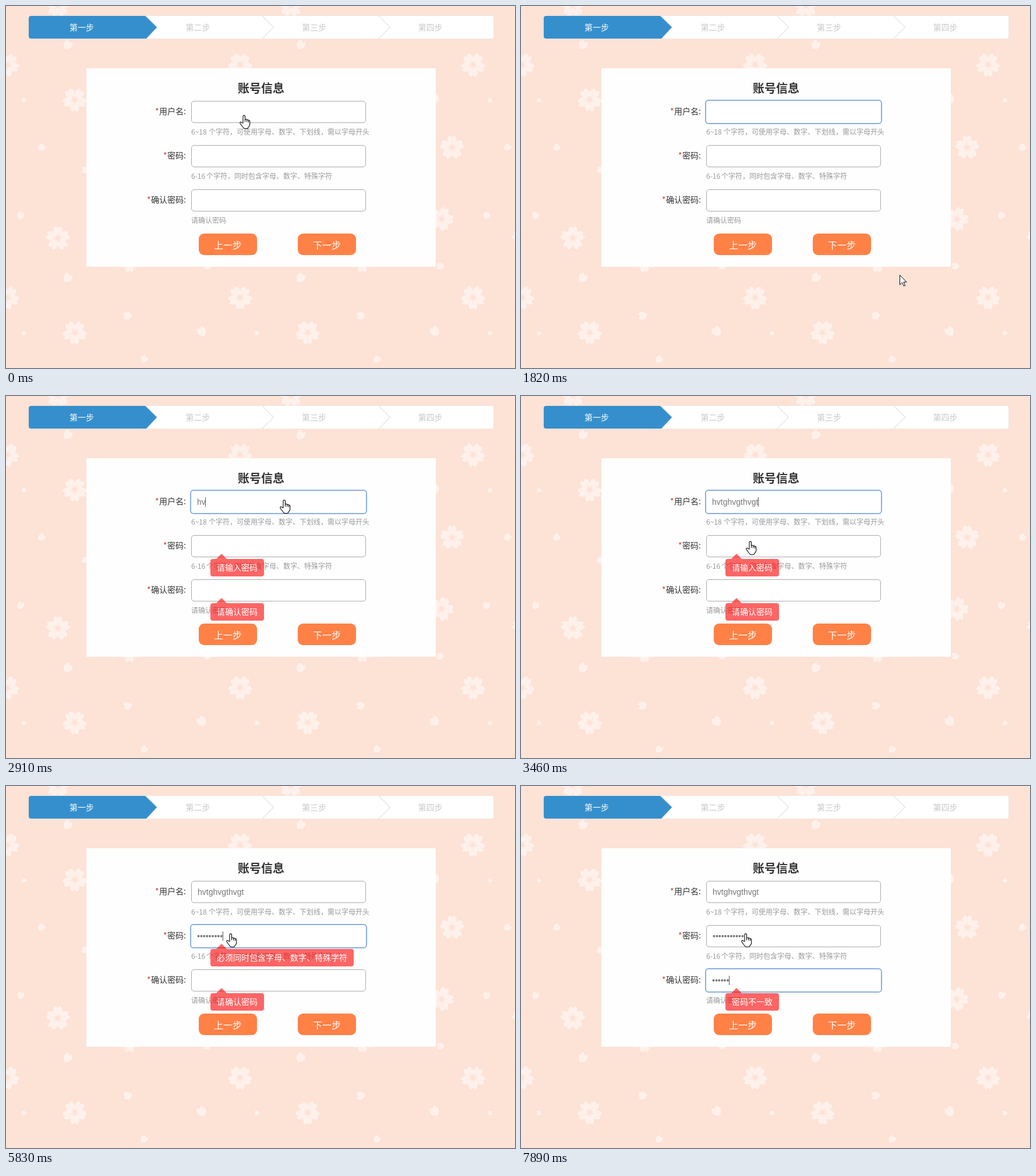
An HTML page for the animation above (8 s loop, 874 px wide and 622 px high).

```html
<!DOCTYPE html>
<html lang="zh-CN">
<head>
<meta charset="utf-8">
<title>账号信息</title>
<style>
  html, body { margin: 0; width: 100%; height: 100%; overflow: hidden; background: #fde2d6; }
  svg { display: block; font: 14px "Noto Sans CJK SC", "Noto Sans CJK", "Noto Sans", sans-serif; }
  .hint { font-size: 12px; fill: #999; }
  .value { font-family: "Liberation Sans", Arial, sans-serif; fill: #777; }
</style>
</head>
<body>
<svg width="874" height="622" viewBox="0 0 874 622">
  <defs>
    <path id="petal" d="M0-3C-9-7-10-16-4-21L0-17.5 4-21C10-16 9-7 0-3Z"/>
    <path id="stamen" d="M0-2V-8.5" stroke="#fde2d6" stroke-width="1.2"/>
    <g id="hand"><path d="M6 14V3c0-3 3.5-3 3.5 0v5.5c.5-1.5 3-1.2 3.2.5c.5-1.2 2.6-.8 2.8.8c.5-1 2.2-.5 2.2 1.2v5.5c0 3-2 3-3.5 6.5c-2 .8-5 .8-7 0C5 20 3 18 1 14.5c-.8-2 1.2-3 2.5-1.5z"
      fill="#fff" stroke="#000" stroke-width="1.1"/><path d="M9.5 8v4M12.7 9v3.5M15.5 10v3" stroke="#000" fill="none"/></g>
    <path id="arrow" d="M.5.5V17l4-3.8 2.6 6 2.5-1-2.6-6H12z" fill="#fff" stroke="#000"/>
    <g id="tile" fill="#fef1eb"></g>
  </defs>
  <rect width="874" height="622" fill="#fde2d6"/>
  <g id="scene"></g>
  <g id="live"></g>
</svg>
<script>
const $ = id => document.getElementById(id);
const text = (x, y, s, attrs = '') => `<text x="${x}" y="${y}" ${attrs}>${s}</text>`;
const rect = (x, y, w, h, r, attrs) =>
  `<rect x="${x}" y="${y}" width="${w}" height="${h}" rx="${r}" ${attrs}/>`;
const use = (id, x, y, more = '') => `<use href="#${id}" transform="translate(${x} ${y}) ${more}"/>`;
const rowY = i => 163 + 76 * i;

// Blossom wallpaper, repeating every 400px
const flowers = [[118, 161, 36], [2, 101, 36], [366, 243, 0], [348, 366, 20], [89, 399, 0], [212, 37, 36]];
const petals = [[106, 67, 35, .95], [31, 162, -80, .5], [61, 243, 50, .75], [136, 282, -70, .7],
  [25, 360, 20, .75], [336, 159, -35, 1], [209, 132, -100, .85], [237, 207, 40, .75], [346, 47, -90, .75]];
const ring = id => [0, 1, 2, 3, 4].map(k => use(id, 0, 0, `rotate(${72 * k})`)).join('');
$('tile').innerHTML =
  flowers.map(([x, y, a]) => `<g transform="translate(${x} ${y}) rotate(${a})">${ring('petal')}${ring('stamen')}</g>`).join('') +
  petals.map(([x, y, a, s]) => use('petal', x, y, `rotate(${a}) scale(${s}) translate(0 12)`)).join('');

let scene = '';
for (const x of [0, 400, 800]) for (const y of [-400, 0, 400]) scene += use('tile', x, y);

// Step bar
scene += rect(38.5, 16.5, 799, 40, 4, 'fill="#fff" stroke="#f1e6e1"');
for (const x of [240, 440, 640])
  scene += `<path d="M${x} 17L${x + 19.5} 36.5 ${x} 56" fill="none" stroke="#e6e6e6" stroke-width="1.4"/>`;
scene += '<path d="M43 17H239L259 36.5 241 56H43a4 4 0 0 1-4-4V21a4 4 0 0 1 4-4z" fill="#368fcd"/>';
[...'一二三四'].forEach((n, i) =>
  scene += text(109 + 199.5 * i, 42, `第${n}步`, `fill="${i ? '#c8c8c8' : '#fff'}"`));

// Form card
scene += rect(138, 107, 600, 341, 0, 'fill="#fefefe"') +
  text(398, 148.5, '账号信息', 'font-size="20" font-weight="bold" fill="#333"');
const rows = [
  ['用户名', '6~18', 348, '个字符，可使用字母、数字、下划线，需以字母开头'],
  ['密码', '6-16', 344, '个字符，同时包含字母、数字、特殊字符'],
  ['确认密码', '', 318, '请确认密码'],
];
rows.forEach(([label, range, hintX, hint], i) => {
  const y = rowY(i), x = 305 - 14 * label.length;
  scene += text(x - 7, y + 23, '*', 'fill="#c33"') + text(x, y + 23, label, 'fill="#333"') +
    text(305, y + 23, ':', 'fill="#333"') +
    text(318, y + 58, range, 'class="hint"') + text(hintX, y + 58, hint, 'class="hint"');
});
[['上一步', 331], ['下一步', 501]].forEach(([label, x]) =>
  scene += rect(x, 391, 100, 37, 9, 'fill="#ff8146"') + text(x + 26, 416.5, label, 'font-size="16" fill="#fff"'));
$('scene').innerHTML = scene;

// Each entry overrides part of the state from its time on
const userName = 'hvtghvgthvgt', NEXT = 3;
const start = { focus: -1, caret: 1, user: 0, pass: 0, again: 0, tip0: '', tip1: '', tip2: '', cursor: 'hand', at: [401, 187] };
const events = [
  [300, { focus: 0 }],
  [730, { caret: 0 }],
  [1130, { caret: 1, cursor: '' }],
  [1280, { cursor: 'arrow', at: [850, 608] }],
  [1400, { at: [800, 572] }],
  [1530, { at: [728, 520] }],
  [1680, { at: [650, 462], caret: 0 }],
  [1830, { at: [590, 425] }],
  [1960, { cursor: 'hand', at: [548, 403] }],
  [2100, { focus: NEXT, tip0: '请输入用户名', tip1: '请输入密码', tip2: '请确认密码', at: [541, 401] }],
  [2250, { at: [538, 385] }],
  [2380, { at: [508, 270] }],
  [2520, { at: [478, 180] }],
  [2640, { focus: 0, caret: 1, tip0: '', at: [470, 178] }],
  [2910, { user: 2 }],
  [3050, { user: 5 }],
  [3180, { user: 8 }],
  [3320, { user: 11, at: [430, 212] }],
  [3460, { user: 12, at: [386, 249] }],
  [3580, { at: [385, 250] }],
  [3850, { focus: 1, tip1: '', at: [384, 251] }],
  [3980, { at: [380, 253] }],
  [4100, { caret: 0, at: [378, 253] }],
  [4380, { caret: 1, pass: 1, tip1: '必须同时包含字母、数字、特殊字符' }],
  [4520, { pass: 2 }],
  [4650, { pass: 3 }],
  [4960, { pass: 5 }],
  [5090, { pass: 6 }],
  [5400, { pass: 7 }],
  [5680, { pass: 8 }],
  [5830, { pass: 9 }],
  [6290, { pass: 10 }],
  [6430, { pass: 11, tip1: '' }],
  [6570, { focus: 2, tip2: '' }],
  [7040, { caret: 0 }],
  [7340, { caret: 1, again: 1, tip2: '密码不一致' }],
  [7470, { again: 3 }],
  [7740, { again: 5 }],
  [7890, { again: 6 }],
];

const ctx = document.createElement('canvas').getContext('2d');
ctx.font = '14px "Liberation Sans", Arial, sans-serif';
const ringStyle = 'stroke="#8aaee2" stroke-width="2"';

function field(i, value, s) {
  const y = rowY(i), focused = s.focus === i;
  let out = focused
    ? rect(317, y - 1, 302, 40, 5, `fill="#fff" ${ringStyle}`)
    : rect(318.5, y + .5, 299, 37, 4.5, 'fill="#fff" stroke="#aaa"');
  out += text(focused ? 328 : 329, y + 24, value, 'class="value"');
  if (focused && s.caret)
    out += rect(Math.floor(328 + ctx.measureText(value).width), y + 11, 1, 16, 0, 'fill="#555"');
  return out;
}

function tip(i, message) {
  if (!message) return '';
  const y = rowY(i) + 41;
  return rect(351, y, 14 * message.length + 22, 30, 4, 'fill="#f00" fill-opacity=".6"') +
    `<path d="M361 ${y}l9-9 9 9z" fill="#f00" fill-opacity=".6"/>` +
    text(362, y + 20, message, 'fill="#fff"');
}

let shown = -1;
function frame() {
  const t = performance.now() % 8000;
  const past = events.filter(([time]) => time <= t);
  if (past.length !== shown) {
    shown = past.length;
    const s = Object.assign({}, start, ...past.map(e => e[1]));
    const values = [userName.slice(0, s.user), '•'.repeat(s.pass), '•'.repeat(s.again)];
    $('live').innerHTML = values.map((v, i) => field(i, v, s)).join('') +
      values.map((_, i) => tip(i, s['tip' + i])).join('') +
      (s.focus === NEXT ? rect(500, 390, 102, 39, 10, `fill="none" ${ringStyle}`) : '') +
      (s.cursor ? use(s.cursor, ...s.at) : '');
  }
  requestAnimationFrame(frame);
}
frame();
</script>
</body>
</html>
```
